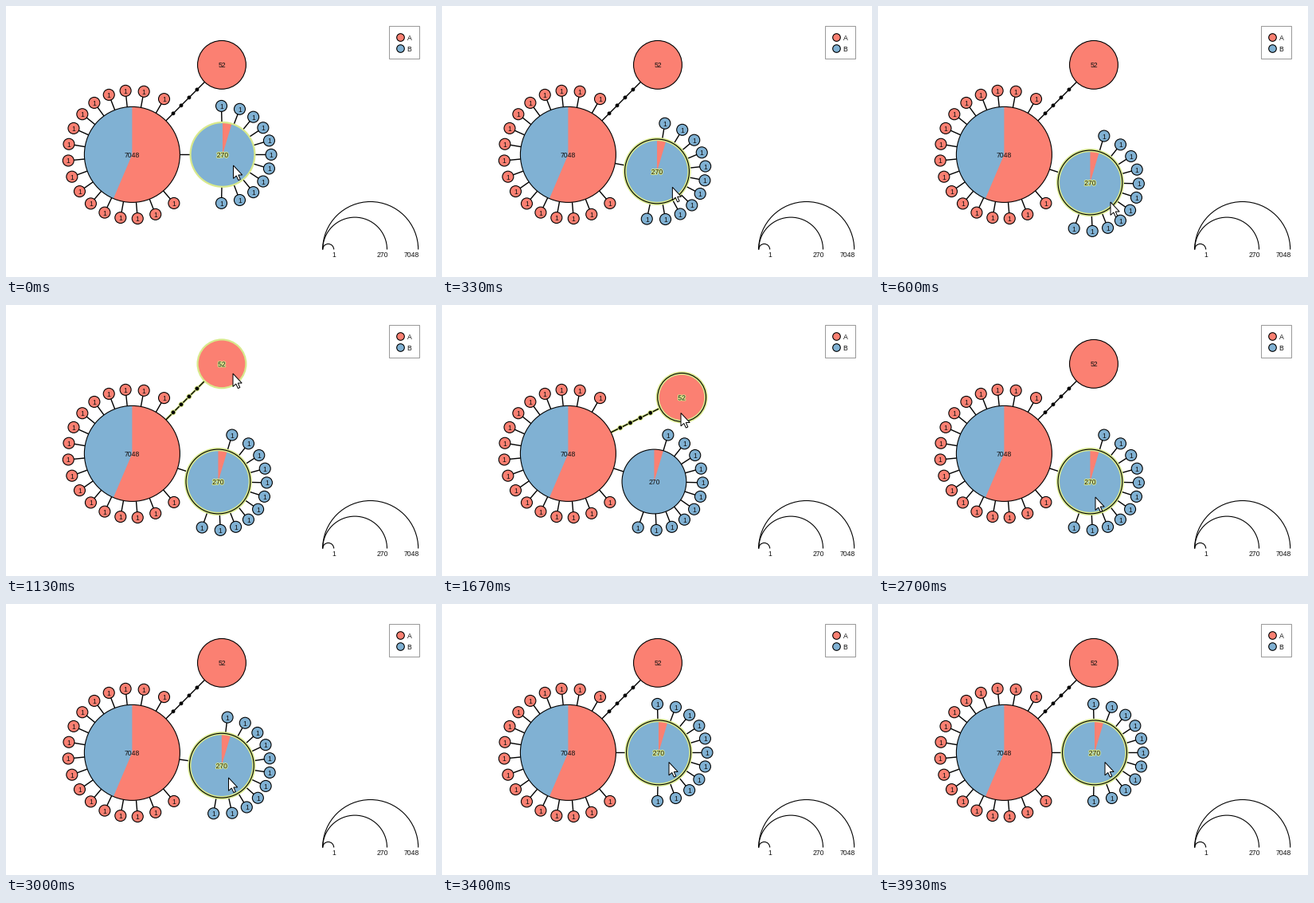
Animation, 540 px wide and 340 px high, one loop 4010 ms. Source, as a matplotlib script:

```python
import numpy as np
import matplotlib.pyplot as plt
from matplotlib.animation import FuncAnimation
from matplotlib.collections import EllipseCollection, LineCollection
from matplotlib.patches import Arc, Circle, Polygon, Rectangle, Wedge
from matplotlib.patheffects import withStroke

W, H, DPI = 540, 340, 100
LOOP, STEP = 4010, 10
PX = 72 / DPI  # one pixel in points
RED, BLUE, GLOW = "#fb8072", "#80b1d3", "#d8e98c"
HUB = np.array([158.4, 186.4])
HUB_R, BRANCH_R, TIP_R, LEAF_R = 60, 40.4, 30.4, 7
BRANCH_DIST, TIP_DIST = 113.6, 159.2
LINE = 1.1 * PX

plt.rcParams["font.family"] = "Liberation Sans"
fig = plt.figure(figsize=(W / DPI, H / DPI), dpi=DPI, facecolor="white")
ax = fig.add_axes([0, 0, 1, 1])
ax.set(xlim=(0, W), ylim=(H, 0))
ax.axis("off")


def polar(center, radius, degrees):
    a = np.radians(degrees)
    return center + np.stack([radius * np.cos(a), radius * np.sin(a)], axis=-1)


def fan(half, step, spread):
    """Leaf angles around 0, evenly spaced but opening up at both ends."""
    k = np.arange(-half, half + 1)
    return step * k + spread * np.sign(k) * np.abs(k / half) ** half


def ease(t, start, end):
    u = np.clip((t - start) / (end - start), 0, 1)
    return u * u * (3 - 2 * u)


def label(x, y, s, ha="center"):
    return ax.text(x, y, s, fontsize=8.6 * PX, ha=ha, va="center_baseline",
                   color="#111", zorder=8)


def discs(points, r, color, z, edge="black"):
    size = np.full(len(points), 2 * r)
    group = EllipseCollection(size, size, np.zeros(len(points)), units="xy",
                              offsets=points, offset_transform=ax.transData,
                              facecolors=color, edgecolors=edge, linewidths=LINE, zorder=z)
    return ax.add_collection(group, autolim=False)


def lines(segments, color="black", width=1.4, z=1):
    group = LineCollection(segments, colors=color, linewidths=width * PX, zorder=z)
    return ax.add_collection(group, autolim=False)


def spokes(center, points):
    return [(center, p) for p in points]


class Node:
    """A pie node that can be hovered or selected."""

    def __init__(self, center, r, text, share):
        self.halo = Circle(center, r, fill=False, ec=GLOW, lw=4.2 * PX, zorder=3)
        self.disc = Circle(center, r, fc=BLUE, lw=0, zorder=2.5)
        self.slice = Wedge(center, r, -90, -90 + 360 * share, fc=RED, lw=0, zorder=2.6)
        self.ring = Circle(center, r, fill=False, ec="black", lw=LINE, zorder=4)
        self.parts = (self.halo, self.disc, self.slice, self.ring)
        for part in self.parts:
            ax.add_patch(part)
        self.text = label(*center, text)
        self.mark("plain")

    def move(self, center):
        for part in self.parts:
            part.set(center=center)
        self.text.set_position(center)

    def mark(self, mode):
        hover = mode == "hover"
        self.halo.set_visible(mode == "selected")
        self.ring.set(edgecolor=GLOW if hover else "black",
                      linewidth=2.2 * PX if hover else LINE)
        glow = [] if mode == "plain" else [withStroke(linewidth=2 * PX, foreground=GLOW)]
        self.text.set_path_effects(glow)


# Hub with its fixed leaves
hub_leaves = polar(HUB, 80.5, 174.6 + fan(8, 14.8, 6.9))
lines(spokes(HUB, hub_leaves))
discs(hub_leaves, LEAF_R, RED, 5)
for p in hub_leaves:
    label(*p, "1")
Node(HUB, HUB_R, "7048", 0.564)

# Branch of 270 and its leaves, turning around the hub
branch_fan = fan(5, 16.7, 7.9)
branch = Node(HUB, BRANCH_R, "270", 0.046)
branch_edges = lines([])
branch_leaves = discs(polar(HUB, 61, branch_fan), LEAF_R, BLUE, 5)
branch_texts = [label(0, 0, "1") for _ in branch_fan]

# Branch of 52 at the end of a dotted chain
chain = 73 + 14.1 * np.arange(4)
tip = Node(HUB, TIP_R, "52", 1)
chain_glow = lines([], GLOW, 3.2, 1)
chain_line = lines([], z=1.2)
dot_glow = discs(polar(HUB, chain, 0), 3.4, GLOW, 1.5, edge="none")
dots = discs(polar(HUB, chain, 0), 2.4, "black", 2, edge="none")

# Colour key
ax.add_patch(Rectangle((481, 25), 38, 41, fc="white", ec="#999", lw=PX))
for y, name, color in ((38.7, "A", RED), (52.7, "B", BLUE)):
    discs([(494.6, y)], 4.8, color, 5)
    label(503.5, y + 0.5, name, ha="left")

# Size key: half circles sharing their left end
for r, x, name in ((LEAF_R, 411.5, "1"), (BRANCH_R, 472.5, "270"), (HUB_R, 509, "7048")):
    ax.add_patch(Arc((397.7 + r, 305.5), 2 * r, 2 * r, theta1=180, theta2=360, lw=LINE))
    label(x, 311.9, name)

ARROW = np.array([(0, 0), (0, 16.4), (3.8, 13), (6.4, 18.6), (8.8, 17.5),
                  (6.3, 12), (11.2, 12)])
cursor = ax.add_patch(Polygon(ARROW, fc="white", ec="black", lw=PX, zorder=10))

# Drags as (start, end)
TURN_OUT, TURN_BACK = (60, 540), (2720, 3250)
SWING_OUT, SWING_BACK = (1190, 1640), (1700, 2150)
HOME = (285.5, 200)
STOPS = [(TURN_OUT, (292, 246)), ((600, 1110), (285, 86)), (SWING_OUT, (300, 135.5)),
         (SWING_BACK, (304, 94)), ((2230, 2660), (273, 241)), (TURN_BACK, (285, 198.5))]
BRANCH_MODES = [(0, "hover"), (70, "selected"), (1180, "plain"),
                (2620, "hover"), (2700, "selected")]
TIP_MODES = [(0, "plain"), (1080, "hover"), (1180, "selected"), (2660, "plain")]


def there_and_back(t, out, back):
    return ease(t, *out) - ease(t, *back)


def mode_at(t, changes):
    return [mode for start, mode in changes if start <= t][-1]


def pointer(t):
    pos = np.array(HOME)
    for span, goal in STOPS:
        pos = pos + (np.array(goal) - pos) * ease(t, *span)
    return pos


def update(i):
    t = i * STEP

    turn = 18 * there_and_back(t, TURN_OUT, TURN_BACK)
    center = polar(HUB, BRANCH_DIST, turn)
    leaves = polar(center, 61, branch_fan + turn)
    branch.move(center)
    branch.mark(mode_at(t, BRANCH_MODES))
    branch_edges.set_segments([(HUB, center)] + spokes(center, leaves))
    branch_leaves.set_offsets(leaves)
    for text, p in zip(branch_texts, leaves):
        text.set_position(p)

    swing = -45 + 18.7 * there_and_back(t, SWING_OUT, SWING_BACK)
    end = polar(HUB, TIP_DIST, swing)
    mode = mode_at(t, TIP_MODES)
    tip.move(end)
    tip.mark(mode)
    for line in (chain_glow, chain_line):
        line.set_segments([(HUB, end)])
    for group in (dot_glow, dots):
        group.set_offsets(polar(HUB, chain, swing))
    for glow in (chain_glow, dot_glow):
        glow.set_visible(mode != "plain")

    cursor.set_xy(ARROW + pointer(t))
    return []


anim = FuncAnimation(fig, update, frames=LOOP // STEP, interval=STEP,
                     init_func=lambda: [], repeat=True, repeat_delay=0)
plt.show()
```
